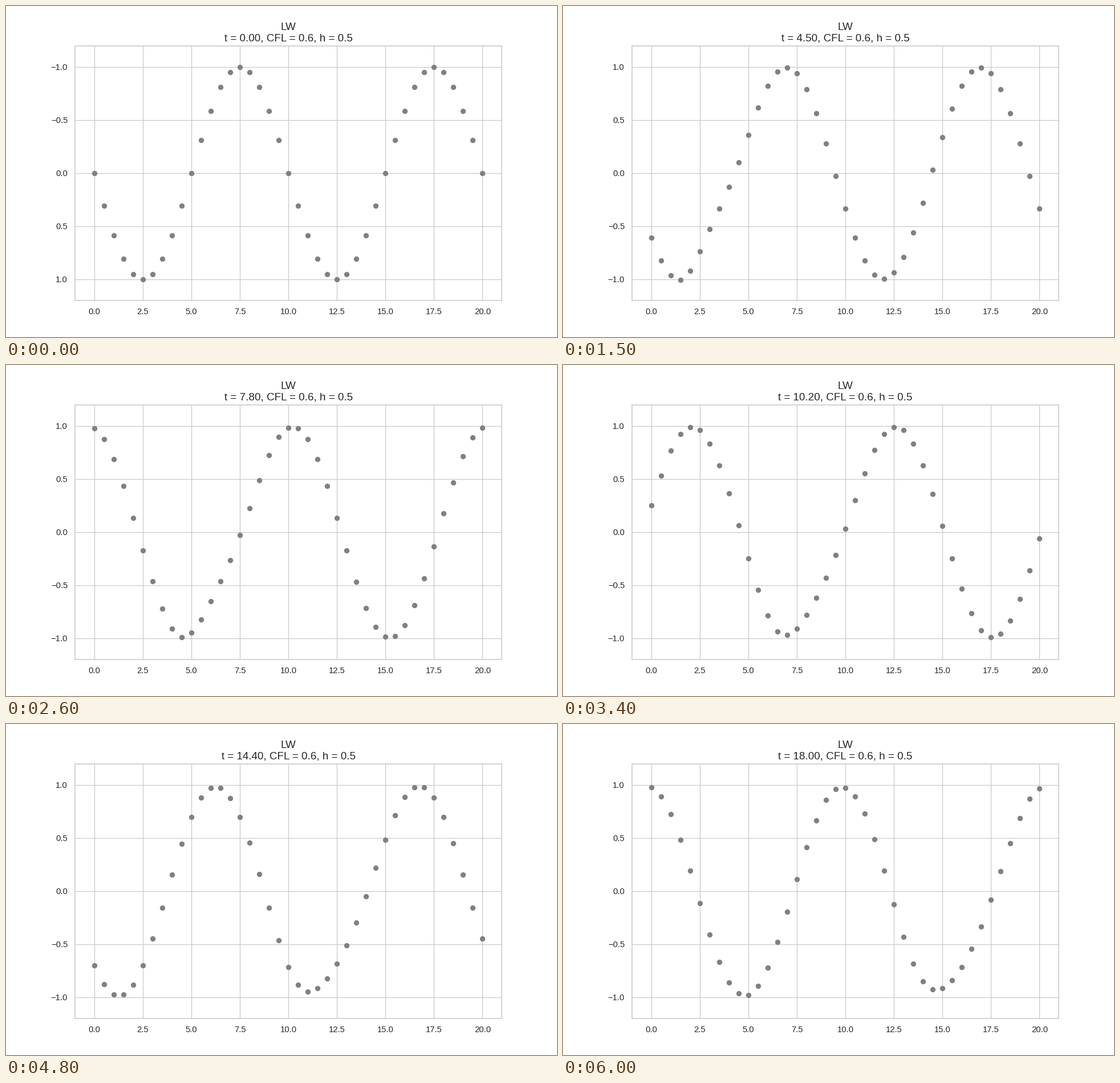
A matplotlib script for the animation above (6100 ms loop, 966 by 580 pixels).

```python
import numpy as np
import matplotlib.pyplot as plt
from matplotlib.animation import FuncAnimation

WIDTH, HEIGHT, DPI = 966, 580, 96
STEPS = 61
CFL, H = 0.6, 0.5
DT = CFL * H

plt.rcParams.update({
    "font.family": "Liberation Sans",
    "text.color": "#262626",
    "axes.edgecolor": "#cccccc",
    "axes.linewidth": 1.25,
    "axes.axisbelow": True,
    "grid.color": "#cccccc",
    "grid.linewidth": 1,
    "grid.linestyle": "-",
})


def lax_wendroff(u):
    """Advance the advection equation one step on a periodic grid."""
    left, right = np.roll(u, 1), np.roll(u, -1)
    return u - CFL / 2 * (right - left) + CFL**2 / 2 * (right - 2 * u + left)


x = np.linspace(0, 20, 41)
waves = [np.sin(2 * np.pi * x / 10)]
for _ in range(STEPS - 1):
    waves.append(lax_wendroff(waves[-1]))

fig, ax = plt.subplots(figsize=(WIDTH / DPI, HEIGHT / DPI), dpi=DPI,
                       facecolor="white")
ax.set_xlim(-1, 21)
ax.set_xticks(np.arange(0, 20.1, 2.5))
ax.set_yticks(np.arange(-1, 1.1, 0.5))
ax.xaxis.set_major_formatter("{x:.1f}")
ax.yaxis.set_major_formatter("{x:.1f}")
ax.grid(True)
ax.tick_params(length=6, pad=3.5, bottom=False, left=False,
               labelsize=11.05, labelcolor="#262626")
dots, = ax.plot(x, waves[0], "o", color="gray", markersize=6)


def draw(n):
    # The value axis starts upside down and is upright from the first step on.
    ax.set_ylim((1.2, -1.2) if n == 0 else (-1.2, 1.2))
    dots.set_ydata(waves[n])
    ax.set_title(f"LW\nt = {n * DT:.2f}, CFL = {CFL}, h = {H}",
                 fontsize=14.15, pad=6)
    return dots,


anim = FuncAnimation(fig, draw, frames=STEPS, interval=100,
                     repeat=True, repeat_delay=0, blit=False)
plt.show()
```
